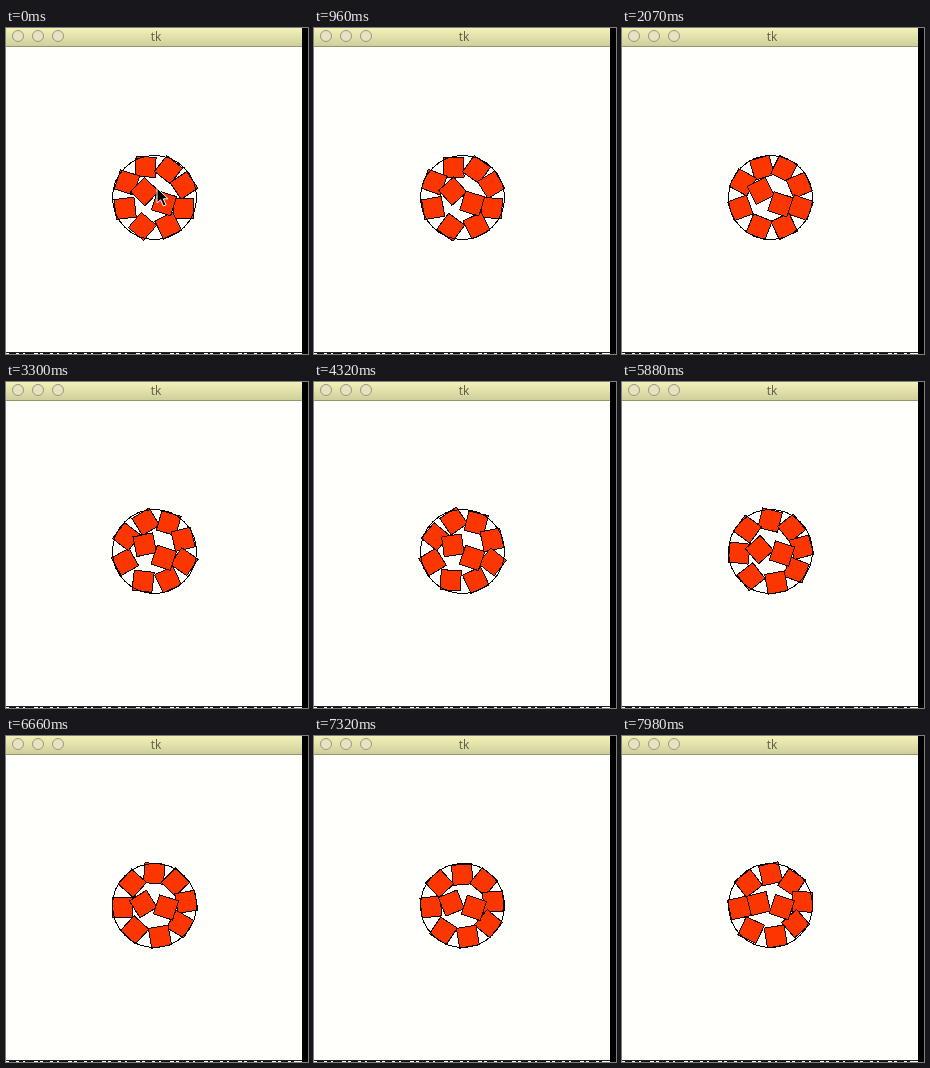
Animation of 302x326 px, one loop 8000 ms. Source, as an HTML page:

```html
<!DOCTYPE html>
<html lang="en">
<head>
<meta charset="utf-8">
<title>tk</title>
<style>
  html, body { margin: 0; width: 100%; height: 100%; overflow: hidden; background: #fffffc; }
  svg { display: block; width: 302px; height: 326px; }
  text { font: 12px "Open Sans", "DejaVu Sans", sans-serif; fill: #5c5b45; }
</style>
</head>
<body>
<svg viewBox="0 0 302 326">
  <defs>
    <linearGradient id="bar" x2="0" y2="1">
      <stop offset="0" stop-color="#f2f2b8"/>
      <stop offset="1" stop-color="#cfcf9c"/>
    </linearGradient>
  </defs>
  <rect width="302" height="326" fill="#fffffc"/>
  <g shape-rendering="crispEdges">
    <g id="squares" fill="#fb3600" stroke="#180400"></g>
    <circle cx="148.5" cy="169.5" r="42" fill="none" stroke="#000"/>
  </g>
  <rect width="296" height="18" fill="url(#bar)"/>
  <path d="M0 18.5H296" stroke="#96946a"/>
  <g fill="#e6e4c0" stroke="#99977a">
    <circle cx="12" cy="8" r="5.5"/>
    <circle cx="32" cy="8" r="5.5"/>
    <circle cx="52" cy="8" r="5.5"/>
  </g>
  <text x="150" y="13" text-anchor="middle">tk</text>
  <path d="M0 324.5H296" stroke="#222"/>
  <path d="M3 325.5H288" stroke="#111" stroke-dasharray="7 3 4 2 9 4 2 3"/>
  <rect x="296" width="6" height="326" fill="#000"/>
  <g id="behind">
    <rect x="296" width="6" height="326" fill="#fff"/>
    <rect x="296" width="6" height="18" fill="#dfe2f8"/>
    <path d="M296 18.5h6" stroke="#777"/>
    <path d="M303 144l-5 7 5 8z" fill="#e02038" stroke="#300"/>
    <path d="M302 154Q296 170 302 187" fill="none" stroke="#140c60"/>
    <path d="M300 207.5h2" stroke="#20b8cc" stroke-width="2"/>
  </g>
  <path id="pointer" d="M0 0V15L3.6 11.8 6.4 18 9 16.8 6.3 10.8H11Z" fill="#000" stroke="#fff"/>
</svg>
<script>
const LOOP = 8000, STEP = 30, RESTART = 4830, RELEASE = 4920, SETTLED = 5880;
const RING = 8, COUNT = 10;
const $ = id => document.getElementById(id);
const cos = deg => Math.cos(deg * Math.PI / 180);
const sin = deg => Math.sin(deg * Math.PI / 180);
const mix = (a, b, u) => a + (b - a) * u;
const polar = (bearing, radius) =>
  ({ x: 148.5 + radius * cos(bearing), y: 169.5 + radius * sin(bearing) });

// Two packings: bearing of the ring and of the inner pair, and when the tilts pass through rest.
const first = { ring: -111, pair: 213, calm: 2070 };
const second = { ring: -95, pair: 190, calm: 7000 };

// Eight squares form a ring facing the centre, two lie inside it.
function packed(i, run) {
  if (i >= RING) {
    const j = i - RING;
    return { ...polar(run.pair + 180 * j, 11.5), tilt: 45 * j - 27 };
  }
  const bearing = run.ring + 45 * i + 5 * cos(45 * i + 20);
  return { ...polar(bearing, 31.5), tilt: bearing };
}

// The loose start: the ring is bunched and uneven, one inner square has strayed.
function scattered(i) {
  if (i >= RING) {
    const j = i - RING;
    return { ...polar(-83, 35 * j), tilt: 5 * j };
  }
  const bearing = second.ring + 45 * i + 18 * sin(45 * i);
  return { ...polar(bearing, i % 2 ? 27 : 37), tilt: bearing };
}

const swing = (i, t, calm) => -20 * cos(72 * i - 20) * Math.sin((t - calm) / 1300);
const wander = (t, seed) => 0.6 * Math.sin(t / 97 + seed * 2.4) * Math.cos(t / 41 + seed * 5.1);

const squares = Array.from({ length: COUNT }, () => {
  const square = document.createElementNS("http://www.w3.org/2000/svg", "rect");
  for (const [name, value] of Object.entries({ x: -10, y: -10, width: 20, height: 20 }))
    square.setAttribute(name, value);
  return $("squares").appendChild(square);
});

function place(t) {
  const run = t < RESTART ? first : second;
  const u = Math.min(1, Math.max(0, (t - RELEASE) / (SETTLED - RELEASE)));
  const order = run === first ? 1 : 1 - (1 - u) ** 2;
  squares.forEach((square, i) => {
    const from = scattered(i), to = packed(i, run);
    const x = mix(from.x, to.x, order) + wander(t, i);
    const y = mix(from.y, to.y, order) + wander(t, i + COUNT);
    const tilt = mix(from.tilt, to.tilt + swing(i, t, run.calm), order);
    square.setAttribute("transform", `translate(${x} ${y}) rotate(${tilt})`);
  });
}

function draw(t) {
  place(t);
  const leave = Math.max(0, (t - 240) / 570) ** 2;
  $("pointer").setAttribute("transform", `translate(${151 - 70 * leave} ${160 + 170 * leave})`);
  $("pointer").style.display = leave < 1 ? "" : "none";
  $("behind").style.display = t >= RESTART && t < 5250 ? "" : "none";
}

const start = performance.now();
function frame() {
  const t = Math.max(0, performance.now() - start) % LOOP;
  draw(Math.floor(t / STEP) * STEP);
  requestAnimationFrame(frame);
}
frame();
</script>
</body>
</html>
```
